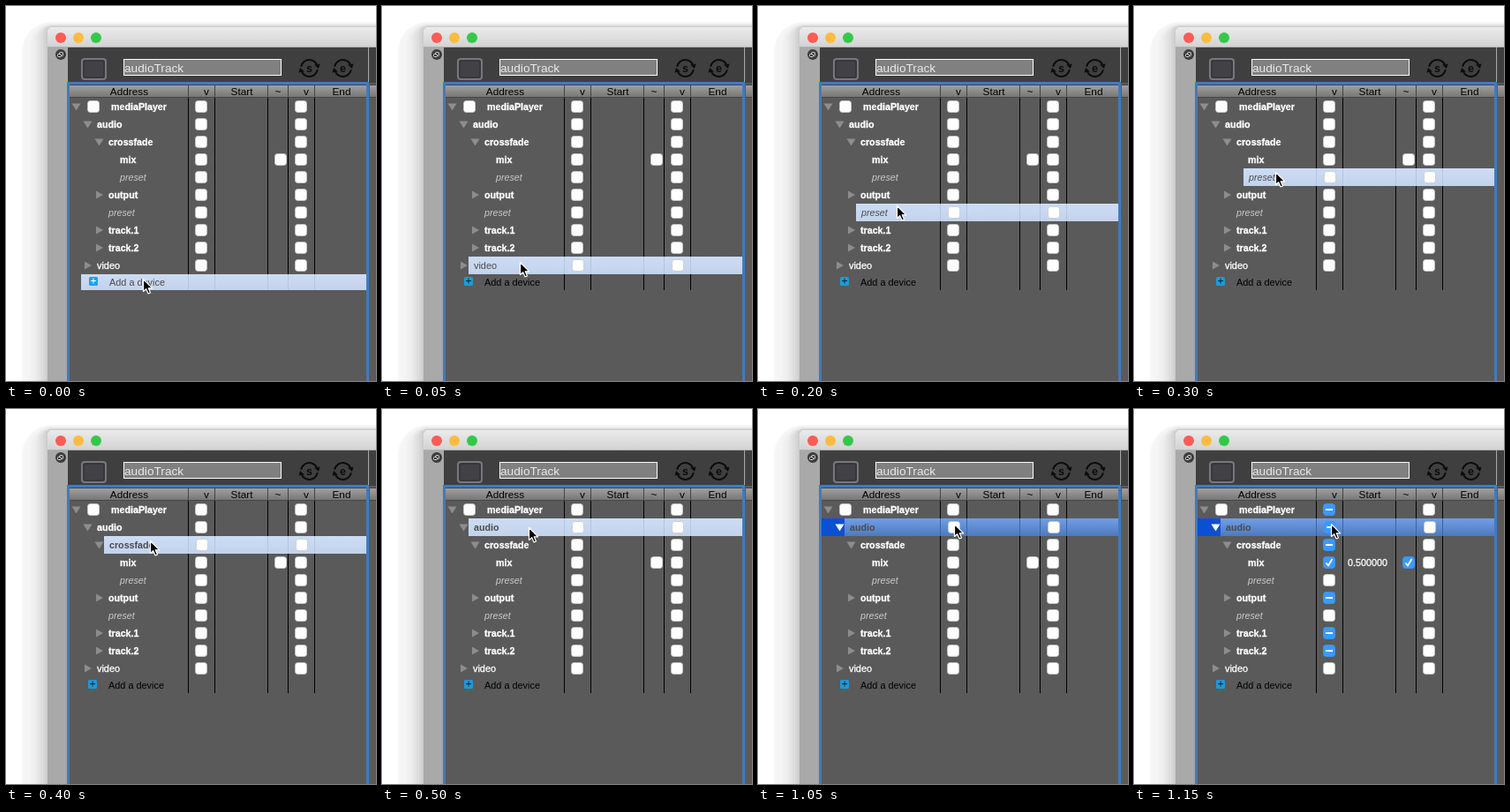
Animation of 419x425 px, one loop 3150 ms. Source, as an HTML page with a canvas:

```html
<!DOCTYPE html>
<html lang="en">
<head>
<meta charset="utf-8">
<title>Device tree</title>
<style>
html, body { margin: 0; width: 100%; height: 100%; overflow: hidden; background: #fff; }
canvas { display: block; width: 419px; height: 425px; }
</style>
</head>
<body>
<canvas id="stage" width="419" height="425"></canvas>
<script>
const ctx = document.getElementById('stage').getContext('2d');
const LOOP = 3150, SELECT_ALL = 550, SELECT_ONE = 1050, CHECKED = 1150;
const SANS = '"Liberation Sans", Arial, sans-serif';
const TOP = 104, ROW = 20, LEFT = 72, RIGHT = 408, AUDIO = 1;
const COLUMNS = [206, 236, 296, 319, 349];
const HEADINGS = [['Address', 139.5], ['v', 227], ['Start', 267], ['~', 308], ['v', 340], ['End', 380]];

// arrow: 'd' open, 'r' closed; selected: part of the branch selection; mark: state after the click
const rows = [
  { name: 'mediaPlayer', level: 0, arrow: 'd', bold: true, mark: 'minus' },
  { name: 'audio', level: 1, arrow: 'd', bold: true, selected: true, mark: 'minus' },
  { name: 'crossfade', level: 2, arrow: 'd', bold: true, selected: true, mark: 'minus' },
  { name: 'mix', level: 3, bold: true, selected: true, mark: 'check' },
  { name: 'preset', level: 3, italic: true },
  { name: 'output', level: 2, arrow: 'r', bold: true, selected: true, mark: 'minus' },
  { name: 'preset', level: 2, italic: true },
  { name: 'track.1', level: 2, arrow: 'r', bold: true, selected: true, mark: 'minus' },
  { name: 'track.2', level: 2, arrow: 'r', bold: true, selected: true, mark: 'minus' },
  { name: 'video', level: 1, arrow: 'r' },
  { name: 'Add a device', level: 0, device: true }
];

// time, x, y of the pointer tip
const pointerKeys = [
  [0, 155, 309], [100, 156, 270], [200, 157, 226], [400, 163, 149], [500, 166, 134], [550, 166, 131]
];

function rect(x, y, w, h, fill) {
  ctx.fillStyle = fill;
  ctx.fillRect(x, y, w, h);
}

function rounded(x, y, w, h, r, fill, stroke, width = 1) {
  ctx.beginPath();
  ctx.roundRect(x, y, w, h, r);
  if (fill) { ctx.fillStyle = fill; ctx.fill(); }
  if (stroke) { ctx.strokeStyle = stroke; ctx.lineWidth = width; ctx.stroke(); }
}

function path(points, fill, stroke, width = 1) {
  ctx.beginPath();
  points.forEach(([x, y], i) => i ? ctx.lineTo(x, y) : ctx.moveTo(x, y));
  if (fill) { ctx.closePath(); ctx.fillStyle = fill; ctx.fill(); }
  if (stroke) { ctx.strokeStyle = stroke; ctx.lineWidth = width; ctx.stroke(); }
}

function disc(x, y, r, fill) {
  ctx.beginPath();
  ctx.arc(x, y, r, 0, Math.PI * 2);
  ctx.fillStyle = fill;
  ctx.fill();
}

function text(value, x, y, size, fill, style = '', align = 'left') {
  ctx.font = `${style} ${size}px ${SANS}`;
  ctx.textAlign = align;
  ctx.fillStyle = fill;
  ctx.fillText(value, x, y);
  // White type on dark is smoothed a little heavier.
  if (fill === '#fff') {
    ctx.strokeStyle = fill;
    ctx.lineWidth = 0.3;
    ctx.strokeText(value, x, y);
  }
}

function vertical(y, h, from, to) {
  const g = ctx.createLinearGradient(0, y, 0, y + h);
  g.addColorStop(0, from);
  g.addColorStop(1, to);
  return g;
}

function drawShadow() {
  const steps = 10;
  for (let i = 0; i < steps; i++) {
    const k = i / (steps - 1), shade = Math.round(247 - 42 * k * k);
    rounded(18 + 27 * k, 18 + 5 * k, 500, 500, 34 - 27 * k, `rgb(${shade},${shade},${shade})`);
  }
}

function drawLoopIcon(x, y, letter) {
  ctx.strokeStyle = '#0c0c0c';
  ctx.lineWidth = 2;
  for (const turn of [0, Math.PI]) {
    ctx.save();
    ctx.translate(x, y);
    ctx.rotate(turn);
    ctx.beginPath();
    ctx.arc(0, 0, 9.5, Math.PI * 1.06, Math.PI * 1.84);
    ctx.stroke();
    path([[5.5, -4], [12, -5], [10.5, 0.5]], '#0c0c0c');
    ctx.restore();
  }
  text(letter, x, y + 4, 12.5, '#0c0c0c', 'bold', 'center');
}

function drawWindow() {
  rect(0, 0, 419, 425, '#fff');
  drawShadow();
  rounded(47, 24, 400, 420, 5, vertical(24, 23, '#ebebeb', '#d2d2d2'));
  rect(47, 47, 23, 378, '#a9a9a9');
  rect(47, 46, 372, 1, '#b0b0b0');
  ['#fc5b57', '#fdbc40', '#34c84a'].forEach((fill, i) => disc(62 + 20 * i, 36, 6, fill));

  disc(62, 55, 6, '#3c3c3c');
  rounded(60.5, 52.5, 4, 4, 1, null, '#ddd');
  rounded(58.5, 54.5, 4, 3, 1, '#3c3c3c', '#ddd');

  rect(70, 47, 349, 378, '#5a5a5a');
  rect(70, 47, 349, 40, '#3f3f3f');
  rounded(86, 60, 27, 23, 3, '#414146', '#77777c', 2);
  rounded(88, 62, 23, 19, 2, null, '#2e2e33');
  rect(133, 60, 179, 19, '#fff');
  rect(134, 61, 177, 17, '#808080');
  text('audioTrack', 134, 75, 13.7, '#e8e8e8');
  drawLoopIcon(343.5, 70.5, 's');
  drawLoopIcon(381.5, 70.5, 'e');

  for (const [x, w] of [[LEFT, RIGHT - LEFT], [412, 7]]) {
    rect(x, 89, w, 1, '#444');
    rect(x, 90, w, 14, vertical(90, 14, '#a0a0a0', '#747474'));
    rect(x, 103, w, 1, '#484848');
  }
  for (const x of COLUMNS) rect(x, 90, 1, 14, '#444');
  for (const [label, x] of HEADINGS) text(label, x, 101, 11.8, '#000', '', 'center');

  rect(410, 47, 1, 378, '#a9a9a9');
  ctx.strokeStyle = '#3f7cbd';
  ctx.lineWidth = 3;
  ctx.strokeRect(70.5, 87.5, 339, 345);
}

function drawCheckbox(x, y, mark) {
  const fill = mark ? '#3b99fc' : '#fff';
  rounded(x - 6.5, y - 6.5, 13, 13, 3, fill, mark ? fill : '#c9c9c9', 0.8);
  if (mark === 'minus') rect(x - 4, y - 1, 8, 2, '#fff');
  if (mark === 'check') path([[x - 3.5, y + 0.5], [x - 1, y + 3.5], [x + 3.5, y - 4]], null, '#fff', 1.8);
}

function drawArrow(x, y, kind, fill) {
  path(kind === 'd'
    ? [[x - 5, y - 3.5], [x + 5, y - 3.5], [x, y + 4.5]]
    : [[x - 3.5, y - 4.5], [x + 4.5, y], [x - 3.5, y + 4.5]], fill);
}

function drawRow(row, index, hover, selected, checked) {
  const y = TOP + index * ROW, mid = y + 10;
  const height = row.device ? 18 : ROW;
  const start = 85 + row.level * 13;
  const shift = hover || selected ? 1 : 0;

  if (selected) {
    rect(LEFT, y, start - LEFT, height, '#0b50d2');
    rect(start, y, RIGHT - start, height, vertical(y, height, '#709ee9', '#4e7abb'));
  } else if (hover) {
    rect(start, y, RIGHT - start, height, vertical(y, height, '#cddcf4', '#c3d3eb'));
  }
  const line = selected ? '#3d64a2' : hover ? '#b5c5df' : '#000';
  for (const x of COLUMNS) rect(x, y, 1, height, line);

  if (row.arrow) drawArrow(start - 5.5, mid, row.arrow, selected ? '#fff' : '#8d8d8d');

  const normal = row.device ? '#000' : row.italic ? '#cacaca' : '#fff';
  const style = row.bold ? 'bold' : row.italic ? 'italic' : '';
  const labelX = row.device ? 116 : index === 0 ? 119 : start + 5;
  text(row.name, labelX + shift, y + (row.device ? 13 : 14), row.bold || row.italic ? 10.7 : 10.9,
    hover ? '#4b4b4b' : normal, style);

  if (row.device) {
    const x = 93 + shift;
    rounded(x, y + 3, 10, 10, 1.5, hover ? '#1aa2f0' : '#1a9bd6');
    const plus = hover ? '#fff' : '#123';
    rect(x + 2, y + 7, 6, 1, plus);
    rect(x + 4.5, y + 4.5, 1, 6, plus);
    return;
  }
  drawCheckbox(221 + shift, mid, checked && row.mark);
  drawCheckbox(334 + shift, mid);
  if (index === 0) drawCheckbox(99, mid);
  if (row.name === 'mix') {
    drawCheckbox(311 + shift, mid, checked && 'check');
    if (checked) text('0.500000', 242, y + 14, 10.8, '#fff');
  }
}

function pointerAt(t) {
  if (t >= CHECKED) return [223, 130];
  if (t >= SELECT_ONE) return [222, 130];
  const time = Math.min(Math.floor(t / 50) * 50, SELECT_ALL);
  const next = Math.max(1, pointerKeys.findIndex(key => key[0] >= time));
  const [t0, x0, y0] = pointerKeys[next - 1], [t1, x1, y1] = pointerKeys[next];
  const k = (time - t0) / (t1 - t0);
  return [Math.round(x0 + (x1 - x0) * k), Math.round(y0 + (y1 - y0) * k)];
}

function drawPointer(x, y) {
  ctx.save();
  ctx.translate(x + 0.5, y + 0.5);
  ctx.lineJoin = 'round';
  path([[0, 0], [0, 14], [3.2, 11.2], [5.6, 16.5], [8, 15.5], [5.7, 10.3], [10.2, 10.3], [0, 0]],
    '#000', '#fff', 1.2);
  ctx.restore();
}

function draw(t) {
  const [x, y] = pointerAt(t);
  const hovered = t >= SELECT_ALL ? AUDIO : Math.floor((y - TOP) / ROW);
  drawWindow();
  rows.forEach((row, i) => {
    const selected = t >= SELECT_ONE ? i === AUDIO : t >= SELECT_ALL && row.selected;
    drawRow(row, i, i === hovered, selected, t >= CHECKED);
  });
  drawPointer(x, y);
}

const began = performance.now();
function tick() {
  draw((performance.now() - began) % LOOP);
  requestAnimationFrame(tick);
}
tick();
</script>
</body>
</html>
```
